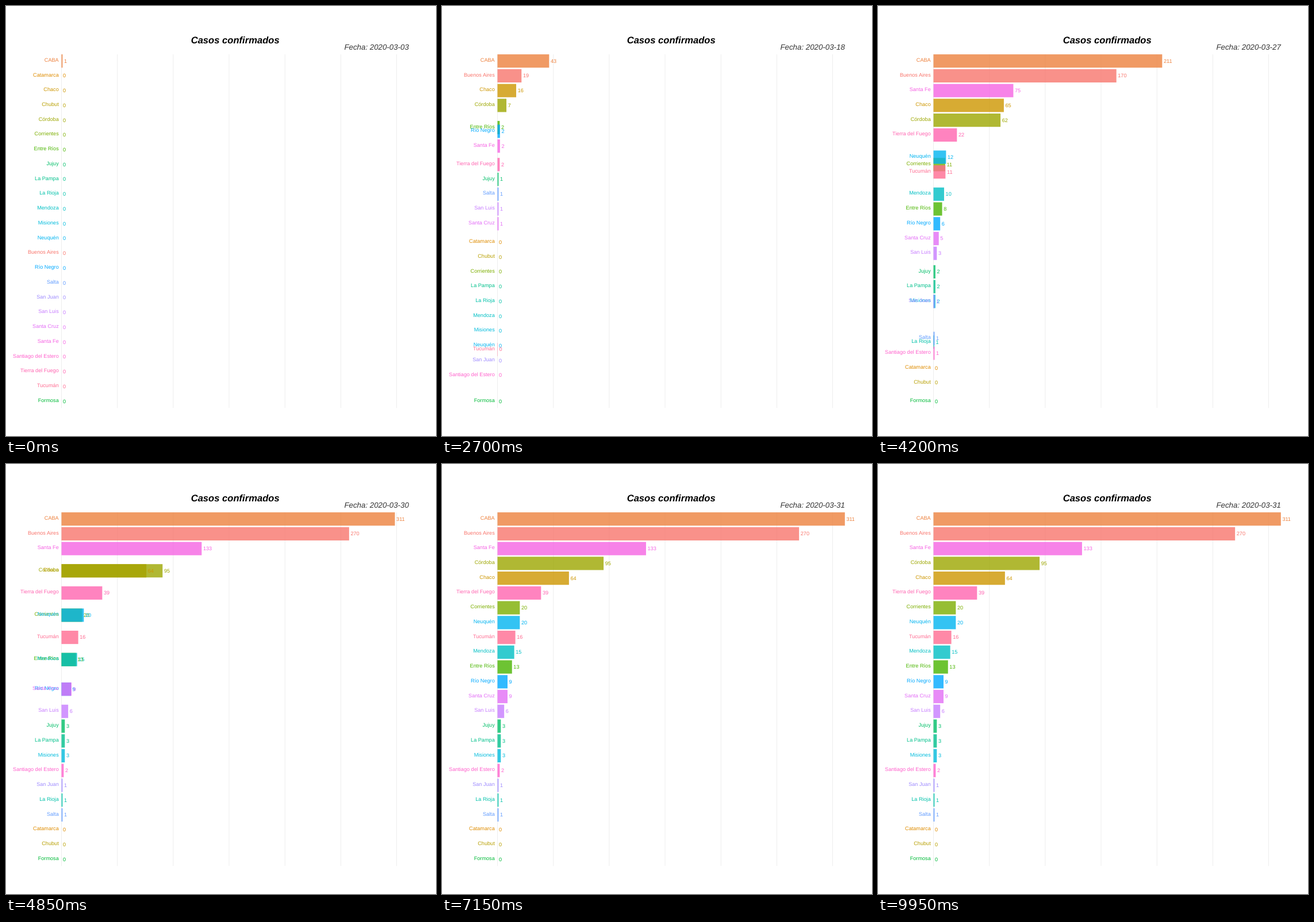
These frames come from a looping animation (748x748 px, 10 s). An HTML page with a canvas:

```html
<!DOCTYPE html>
<html lang="es">
<head>
<meta charset="utf-8">
<title>Casos confirmados</title>
<style>
  html, body { margin: 0; width: 100%; height: 100%; overflow: hidden; background: #fff; }
  canvas { display: block; }
</style>
</head>
<body>
<canvas id="stage" width="748" height="748"></canvas>
<script>
const ctx = document.getElementById('stage').getContext('2d');
const FONT = '"Liberation Sans", Arial, sans-serif';
const FRAME_MS = 50, LOOP_FRAMES = 200, LAST_DAY = 28;
const LEFT = 96.5, RIGHT = 700.8, TOP = 84.1, BOTTOM = 699.2;
const PER_CASE = (RIGHT - LEFT) / 311;
const PITCH = (BOTTOM - TOP) / 23.9;
const BAR_HEIGHT = PITCH * 0.9;

const provinces = [];
const mix = (a, b, t) => a + (b - a) * t;

// Key points map a day to a case count; growth is linear in between.
function curve(name, keys = {}) {
  provinces.push({ name, points: Object.entries(keys).map(pair => pair.map(Number)) });
}

// A few cases that stay level until day 20, then climb for a week.
function late(name, start, end, base = 1) {
  curve(name, { [start]: base, [Math.max(start, 20)]: base, 27: end });
}

// Declared in tie-breaking order.
curve('CABA', { 0: 1, 8: 12, 15: 43, 20: 112, 28: 311 });
curve('Catamarca');
curve('Chaco', { 5: 1, 8: 6, 15: 16, 20: 35, 27: 88, 28: 64 });
curve('Chubut');
curve('Córdoba', { 3: 1, 8: 4, 15: 7, 20: 30, 28: 95 });
curve('Corrientes', { 18: 3, 20: 3, 28: 20 });
curve('Entre Ríos', { 11: 1, 19: 3, 20: 3, 27: 13 });
late('Jujuy', 14, 3);
late('La Pampa', 21, 3);
late('La Rioja', 24, 1);
curve('Mendoza', { 17: 1, 19: 5, 20: 5, 28: 15 });
late('Misiones', 19, 3);
late('Neuquén', 18, 20, 2);
curve('Buenos Aires', { 2: 1, 8: 6, 15: 19, 20: 71, 28: 270 });
curve('Río Negro', { 7: 1, 16: 3, 19: 4, 28: 9 });
late('Salta', 15, 1);
late('San Juan', 22, 1);
late('San Luis', 6, 6);
late('Santa Cruz', 11, 9);
curve('Santa Fe', { 12: 1, 16: 3, 19: 5, 20: 18, 28: 133 });
late('Santiago del Estero', 19, 2);
curve('Tierra del Fuego', { 13: 2, 16: 2, 19: 6, 20: 6, 28: 39 });
curve('Tucumán', { 16: 1, 19: 7, 20: 7, 28: 16 });
curve('Formosa');

function casesOn(points, day) {
  const next = points.findIndex(([d]) => d > day);
  if (next === 0 || !points.length) return 0;
  if (next < 0) return points[points.length - 1][1];
  const [d0, v0] = points[next - 1], [d1, v1] = points[next];
  return Math.floor(mix(v0, v1, (day - d0) / (d1 - d0)) + 1e-6);
}

// Polar LUV colour at luminance 65, chroma 100.
function hueColor(degrees) {
  const h = degrees * Math.PI / 180, L = 65, C = 100;
  const Y = ((L + 16) / 116) ** 3;
  const u = C * Math.cos(h) / (13 * L) + 0.1978398;
  const v = C * Math.sin(h) / (13 * L) + 0.4683363;
  const X = 9 * Y * u / (4 * v);
  const Z = -X / 3 - 5 * Y + 3 * Y / v;
  const channel = c => {
    const s = c > 0.00304 ? 1.055 * c ** (1 / 2.4) - 0.055 : 12.92 * c;
    return Math.round(255 * Math.min(1, Math.max(0, s)));
  };
  const rgb = [
    3.240479 * X - 1.53715 * Y - 0.498535 * Z,
    -0.969256 * X + 1.875992 * Y + 0.041556 * Z,
    0.055648 * X - 0.204043 * Y + 1.057311 * Z
  ].map(channel);
  return `rgb(${rgb})`;
}

[...provinces].sort((a, b) => a.name.localeCompare(b.name, 'es'))
  .forEach((p, i) => { p.color = hueColor(15 + 15 * i); });

for (const p of provinces) {
  p.cases = Array.from({ length: LAST_DAY + 1 }, (_, day) => casesOn(p.points, day));
  p.ranks = [];
}

// Among equals the earlier declared comes first; San Juan leads once it has cases.
for (let day = 0; day <= LAST_DAY; day++) {
  const leads = p => p.name === 'San Juan' && p.cases[day] > 0;
  [...provinces]
    .sort((a, b) => b.cases[day] - a.cases[day] || leads(b) - leads(a))
    .forEach((p, i) => { p.ranks[day] = i; });
}

// Frames spent moving from one day to the next.
const stepsAfter = day => day < 8 ? 4 : day < 15 ? 3 : day % 2 ? 4 : 3;

function dayAt(frame) {
  let day = 0;
  while (day < LAST_DAY && frame >= stepsAfter(day)) frame -= stepsAfter(day++);
  return day < LAST_DAY ? [day, frame / stepsAfter(day)] : [LAST_DAY, 0];
}

// Baselines sit on whole pixels.
function text(str, x, y, color, font, align) {
  ctx.font = `${font} ${FONT}`;
  ctx.textAlign = align;
  ctx.fillStyle = color;
  ctx.fillText(str, x, Math.round(y));
}

function draw(frame) {
  const [day, t] = dayAt(frame);
  const next = Math.min(day + 1, LAST_DAY);
  const poses = provinces.map(p => ({
    name: p.name,
    color: p.color,
    y: TOP + BAR_HEIGHT / 2 + mix(p.ranks[day], p.ranks[next], t) * PITCH,
    width: mix(p.cases[day], p.cases[next], t) * PER_CASE,
    label: p.cases[t >= 0.5 ? next : day]
  }));

  ctx.fillStyle = '#fff';
  ctx.fillRect(0, 0, 748, 748);
  ctx.fillStyle = '#ebebeb';
  for (let n = 0; n <= 300; n += 50) {
    ctx.fillRect(LEFT + n * PER_CASE - 0.4, TOP, 0.9, BOTTOM - TOP);
  }

  ctx.globalAlpha = 0.8;
  for (const p of poses) {
    ctx.fillStyle = p.color;
    ctx.fillRect(LEFT, p.y - BAR_HEIGHT / 2, p.width, BAR_HEIGHT);
  }
  ctx.globalAlpha = 1;
  for (const p of poses) text(p.name, LEFT - 4.8, p.y + 1.1, p.color, '9.14px', 'right');
  for (const p of poses) text(p.label, LEFT + p.width + 2.6, p.y + 2.9, p.color, '9.14px', 'left');

  const date = String(3 + (t > 0.5 ? next : day)).padStart(2, '0');
  text('Casos confirmados', (LEFT + RIGHT) / 2, 65, '#000', 'italic bold 16.6px', 'center');
  text(`Fecha: 2020-03-${date}`, RIGHT, 76, '#333', 'italic 13.3px', 'right');
}

ctx.textBaseline = 'alphabetic';
ctx.textRendering = 'geometricPrecision';
const start = performance.now();

function tick() {
  const elapsed = performance.now() - start;
  draw(Math.floor((elapsed + 0.5) / FRAME_MS) % LOOP_FRAMES);
  requestAnimationFrame(tick);
}
tick();
</script>
</body>
</html>
```
